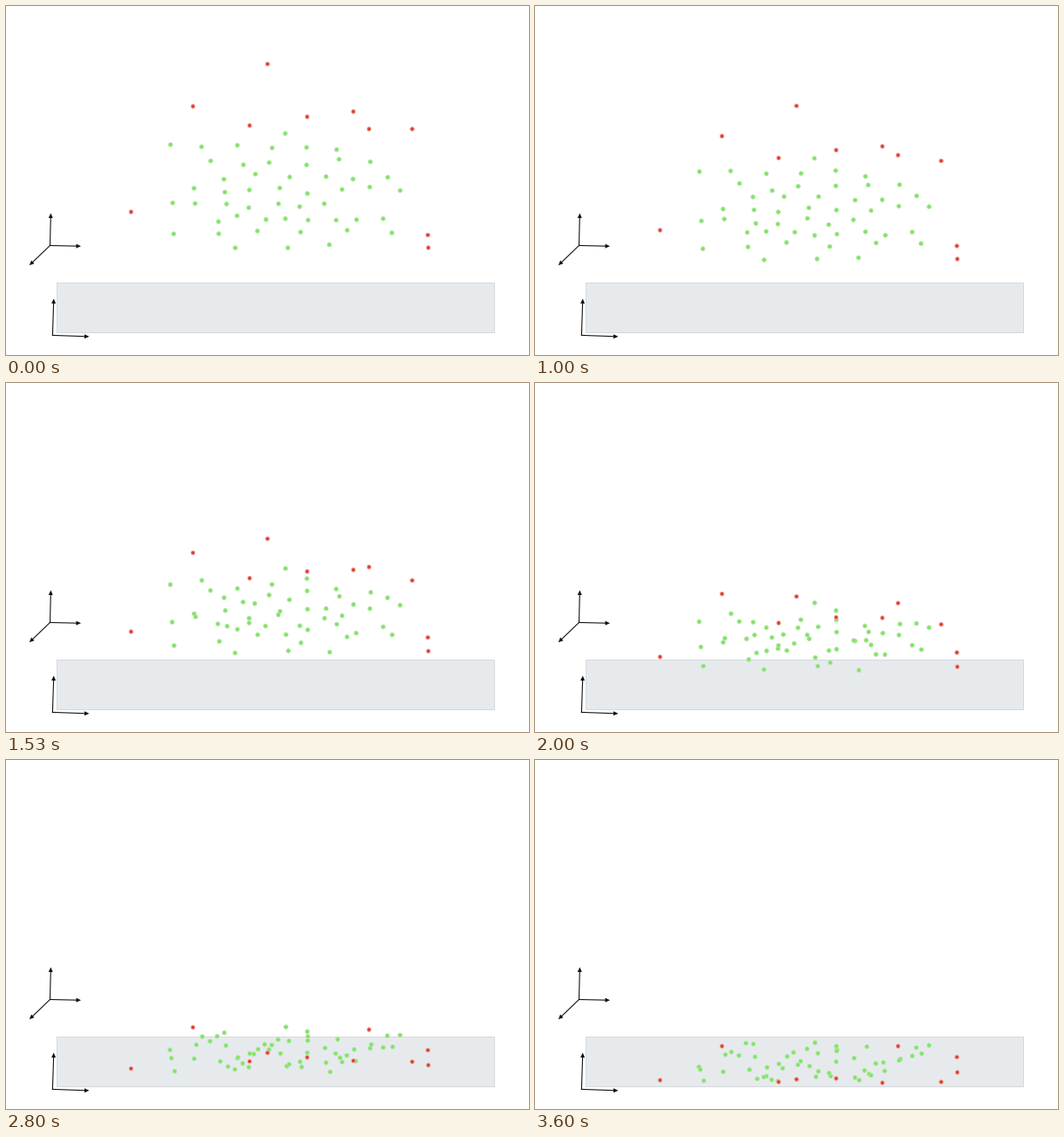
Write a matplotlib script that moves like this. It is 600 by 400 pixels and loops after 3670 ms.

```python
import numpy as np
import matplotlib.pyplot as plt
from matplotlib.animation import FuncAnimation
from matplotlib.patches import Polygon, Rectangle

W, H, DPI = 600, 400, 100
PT = 72 / DPI  # points per pixel
TICK, LOOP = 10, 3670  # ms
FPS = 15
STEPS = 54  # moves from start to rest

INK = "#111111"
GREEN, GREEN_RIM = "#7ce75c", "#b4e3a8"
RED, RED_RIM = "#e23c2b", "#ecb0a9"

# Cloud rows from top to bottom: left x, right x, number of dots
ROWS = [(316, 316, 1), (184, 380, 6), (230, 418, 6), (250, 438, 6),
        (216, 448, 8), (188, 369, 7), (240, 434, 8), (194, 441, 6),
        (263, 375, 3)]
ROW_TOP, ROW_GAP = 146, 16.3

# Outliers: x, start y, end y
OUTLIERS = [(300, 66.5, 366), (214.5, 115, 328), (345.5, 127, 365),
            (279.5, 137, 369), (398.5, 121, 370), (416.5, 141, 328),
            (466, 141, 369), (143.5, 236, 367), (484, 262.5, 340.5),
            (484.5, 277, 358)]


def ease_in_out(x):
    """Cubic Bezier easing with handles (0.42, 0) and (0.58, 1)."""
    t = np.linspace(0, 1, 1001)
    bx = 3 * (1 - t) ** 2 * t * 0.42 + 3 * (1 - t) * t ** 2 * 0.58 + t ** 3
    by = 3 * (1 - t) * t ** 2 + t ** 3
    return np.interp(x, bx, by)


def make_cloud(rng):
    """Jittered rows of dots, and where each dot lands inside the slab."""
    grid = [(x, ROW_TOP + ROW_GAP * k)
            for k, (left, right, n) in enumerate(ROWS)
            for x in np.linspace(left, right, n)]
    start = np.array(grid) + rng.uniform(-1, 1, (len(grid), 2)) * (5, 4)
    x, y = start.T
    highest = np.maximum(324, y + 75)  # low dots land low
    spread = np.arange(len(grid)) * 0.618 % 1
    end_y = highest + (369 - highest) * spread
    end_x = x + rng.uniform(-2, 2, len(grid))
    return start, np.column_stack([end_x, end_y])


def arrow(ax, tail, tip, length=5.5, width=5):
    tail, tip = np.array(tail, float), np.array(tip, float)
    along = (tip - tail) / np.hypot(*(tip - tail))
    side = np.array([-along[1], along[0]]) * width / 2
    neck = tip - along * length
    ax.plot(*zip(tail, neck), color=INK, lw=1.1 * PT, zorder=2)
    ax.add_patch(Polygon([tip, neck + side, neck - side], fc=INK, lw=0, zorder=2))


fig = plt.figure(figsize=(W / DPI, H / DPI), dpi=DPI, facecolor="white")
ax = fig.add_axes([0, 0, 1, 1])
ax.set_xlim(0, W)
ax.set_ylim(H, 0)
ax.axis("off")

ax.add_patch(Rectangle((57.9, 316.9), 502, 57, fc="#e6eaed", ec="#d5d9dc",
                       lw=PT, zorder=1))
for tip in [(51.4, 237.5), (86, 275.3), (26.8, 297.2)]:
    arrow(ax, (50.5, 274.5), tip)
for tip in [(54.8, 335.5), (95.5, 378.9)]:
    arrow(ax, (53.4, 377.4), tip)

green_start, green_end = make_cloud(np.random.default_rng(4))
red_x, red_y0, red_y1 = np.array(OUTLIERS).T
start = np.vstack([green_start, np.column_stack([red_x, red_y0])])
end = np.vstack([green_end, np.column_stack([red_x, red_y1])])
is_red = np.arange(len(start)) >= len(green_start)

dots = ax.scatter(
    *start.T,
    s=(4.6 * PT) ** 2,
    c=np.where(is_red, RED, GREEN),
    edgecolors=np.where(is_red, RED_RIM, GREEN_RIM),
    linewidths=0.9 * PT,
    zorder=3,
)


def draw(i):
    # The picture steps at 15 fps, rounded to the nearest tick
    step = int((i + 0.5) * TICK * FPS / 1000)
    dots.set_offsets(start + (end - start) * ease_in_out(step / STEPS))
    return [dots]


anim = FuncAnimation(fig, draw, frames=LOOP // TICK, interval=TICK,
                     repeat=True, repeat_delay=0)
plt.show()
```
